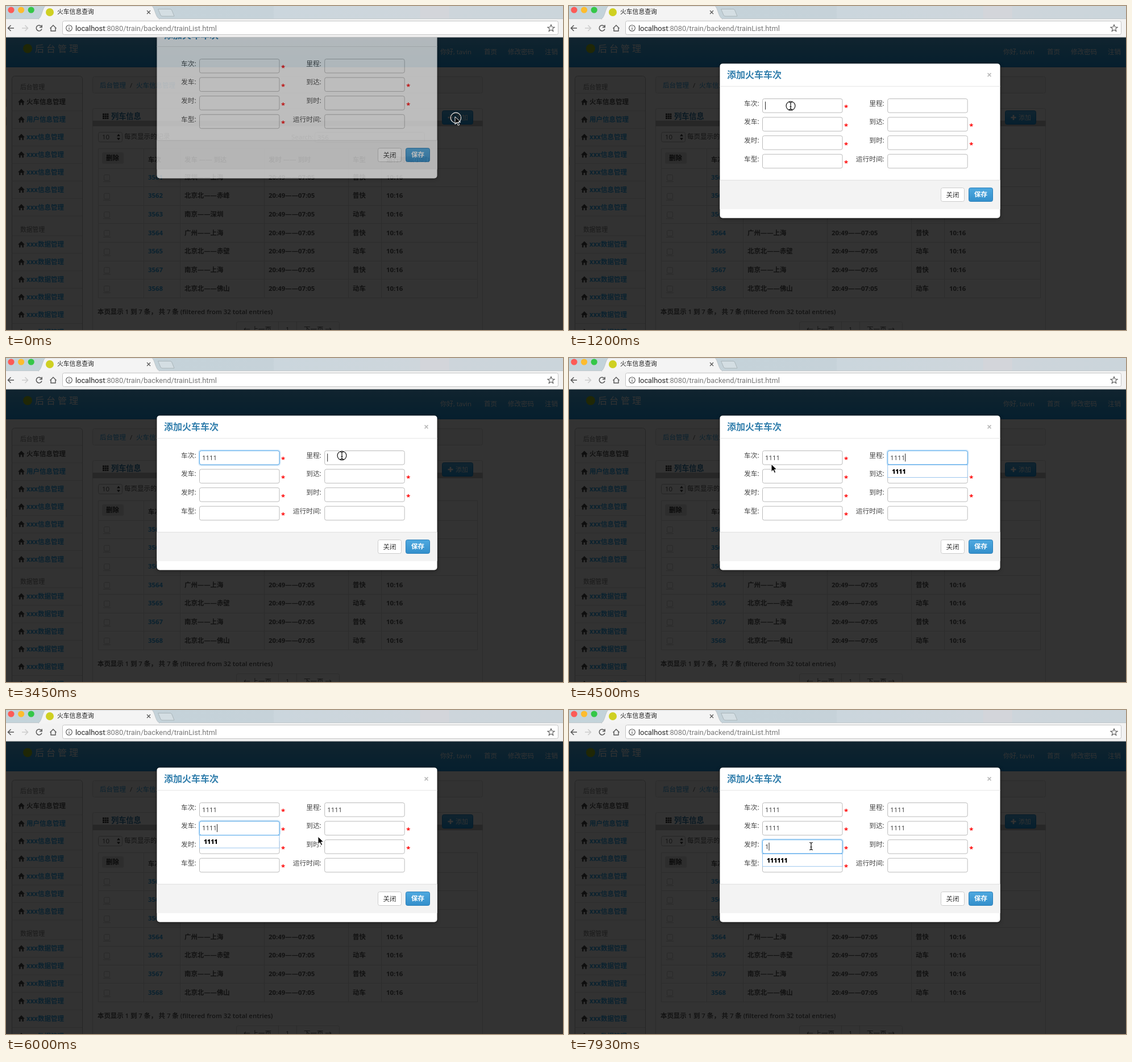
Recreate the animation shown at these times as an HTML page. Size 980 by 571 pixels, loop 8 s.

```html
<!DOCTYPE html>
<html lang="zh-CN">
<head>
<meta charset="utf-8">
<title>火车信息查询</title>
<style>
  html, body { margin: 0; width: 100%; height: 100%; overflow: hidden; background: #333; }
  svg { display: block; width: 980px; height: 571px; }
  text { font-family: "Open Sans", "Noto Sans CJK SC", "Noto Sans CJK", sans-serif; white-space: pre; }
  .card { filter: drop-shadow(0 2.6px 3px rgba(0, 0, 0, .3)); }
</style>
</head>
<body>
<svg id="stage" viewBox="0 0 980 571" xmlns="http://www.w3.org/2000/svg"></svg>
<script>
const LOOP = 8000, STEP = 150, LAST = 7930;
const BLUE = '#2fa4e7', INK = '#555', LINE = '#ddd';

// Markup helpers; text is placed by its vertical centre
const text = (x, cy, s, { size = 11.5, fill = INK, weight = 400, more = '' } = {}) =>
  `<text x="${x}" y="${cy + size * 0.37}" font-size="${size}" fill="${fill}" font-weight="${weight}" ${more}>${s}</text>`;
const rect = (x, y, w, h, fill, more = '') =>
  `<rect x="${x}" y="${y}" width="${w}" height="${h}" fill="${fill}" ${more}/>`;
const path = (d, stroke, width = 1, fill = 'none', more = '') =>
  `<path d="${d}" stroke="${stroke}" stroke-width="${width}" fill="${fill}" ${more}/>`;
const times = (n, f) => Array.from({ length: n }, (_, i) => f(i)).join('');
const edge = (color, r = 0) => `stroke="${color}" rx="${r}"`;

const defs = `<defs>
  <linearGradient id="blue" x2="0" y2="1"><stop stop-color="#54b4eb"/><stop offset=".6" stop-color="#2fa4e7"/><stop offset="1" stop-color="#1d9ce5"/></linearGradient>
  <linearGradient id="save" x2="0" y2="1"><stop stop-color="#4fa9e0"/><stop offset="1" stop-color="#338fcb"/></linearGradient>
  <linearGradient id="strip"><stop stop-color="#c3d3da"/><stop offset=".48" stop-color="#c6d2d9"/><stop offset=".481" stop-color="#cbd6dd"/>
    <stop offset=".743" stop-color="#ced6dc"/><stop offset=".744" stop-color="#d3d5da"/><stop offset=".795" stop-color="#d3d5da"/><stop offset=".796" stop-color="#cdd5db"/><stop offset="1" stop-color="#cbd5db"/></linearGradient>
</defs>`;

function navbar() {
  const white = { fill: '#fff' };
  return rect(0, 55, 980, 53, 'url(#blue)') + rect(0, 107, 980, 1, '#178acc') +
    '<circle cx="38" cy="75" r="8" fill="#9cc21f"/>' +
    text(51, 75, '后台管理', { size: 16, fill: '#fff', weight: 300, more: 'letter-spacing="4"' }) +
    text(764, 81, '你好, tavin', white) + text(841, 81, '首页', white) +
    text(883, 81, '修改密码', white) + text(948, 81, '注销', white);
}

function menu(top, title, labels) {
  return text(25, top, title, { size: 10.8, fill: '#777' }) + labels.map((label, i) => {
    const y = top + 26 + i * 30.9, current = label[0] === '火';
    return path(`M10.5 ${y - 15}H134`, LINE) +
      path(`M21 ${y + .5}l6-6l6 6h-2v5h-2.6v-4h-2.8v4H23v-5z`, 'none', 0, '#444') +
      text(36, y, label, { fill: current ? INK : BLUE, weight: 700 });
  }).join('');
}

function sidebar() {
  const info = ['火车信息管理', '用户信息管理', ...Array(5).fill('xxx信息管理')];
  return rect(10.5, 123.5, 124, 470, '#fdfdfd', edge('#bbb', 5)) +
    menu(143, '后台管理', info) + path('M10.5 370H134', LINE) +
    menu(394, '数据管理', Array(6).fill('xxx数据管理'));
}

function table() {
  const cols = [250, 314, 462, 610, 669];
  const heads = ['车次', '发车 —— 到达', '发时 —— 到时', '车型', '运行时间(小时)'];
  const routes = ['3561 深圳——上海', '3562 北京北——赤峰', '3563 南京——深圳', '3564 广州——上海',
    '3565 北京北——赤壁', '3567 南京——上海', '3568 北京北——佛山'];
  const bold = { size: 11.4, weight: 700 };
  const row = (route, i) => {
    const y = 301.5 + i * 32.65;
    const [id, trip] = route.split(' ');
    const cells = [id, trip, '20:49——07:05', i && i % 2 === 0 ? '动车' : '普快', '10:16'];
    return path(`M162 ${Math.round(y - 16) + .5}H829`, LINE) +
      rect(172.5, y - 4, 10, 10, '#fff', edge('#ccc', 2)) + path(`M171 ${y + 8}h13`, '#ccc') +
      cells.map((c, k) => text(cols[k], y, c, { ...bold, fill: k ? INK : BLUE })).join('');
  };
  return rect(162.5, 251.5, 667, 263, 'none', edge(LINE)) +
    path('M242.5 251V514M306.5 251V514M454.5 251V514M602.5 251V514M660.5 251V514', LINE) +
    rect(169, 258, 38, 20, '#e2e2e2', 'rx="3"') + text(176, 268, '删除', { ...bold, fill: '#333' }) +
    heads.map((h, k) => text(cols[k], 270.5, h, bold)).join('') + routes.map(row).join('');
}

function page() {
  return rect(0, 55, 980, 516, '#fff') + navbar() + sidebar() +
    rect(152.5, 124.5, 686, 29, '#fafafa', edge(LINE, 3)) +
    text(165, 139.5, '后台管理', { fill: BLUE }) + text(218, 139.5, '/') + text(229, 139.5, '火车信息管理', { fill: BLUE }) +
    rect(152.5, 180.5, 686, 400, '#fff', edge(LINE, 3)) + rect(152, 202, 687, 10, '#c4c4c4') +
    times(9, i => rect(170 + i % 3 * 3.7, 189.5 + (i / 3 | 0) * 3.5, 3, 2.7, '#333')) +
    text(185, 194, '列车信息', { size: 13.2, fill: '#317eac', weight: 700 }) +
    rect(767.5, 184.5, 54, 24, 'url(#blue)', edge('#178acc', 3)) +
    path('M777.5 196.5h9M782 192v9', '#fff', 2.6) + text(791, 196.5, '添加', { fill: '#fff', size: 11 }) +
    rect(162.5, 222.5, 42, 17, '#fff', edge('#bbb', 3)) + text(169, 231, '10') +
    path('M195 229.5l3-4l3 4zM195 232.5l3 4l3-4z', 'none', 0, '#333') +
    text(208, 230, '每页显示的记录', { weight: 500 }) +
    text(502, 231, 'Search:') + rect(543.5, 222.5, 193, 18, '#fff', edge('#bbb', 3)) + text(548, 231.5, '356') +
    table() +
    text(161, 538.5, '本页显示 1 到 7 条， 共 7 条 (filtered from 32 total entries)', { size: 11.4, weight: 600 }) +
    rect(405.5, 556.5, 181, 26, '#fff', edge(LINE, 3)) + path('M479.5 556V571M511.5 556V571', LINE) +
    text(418, 569.5, '← 上一页') + text(492, 569.5, '1') + text(524, 569.5, '下一页 →') +
    rect(0, 55, 980, 516, '#000', 'opacity=".8"');
}

// Form grid
const labels = ['车次', '里程', '发车', '到达', '发时', '到时', '车型', '运行时间'];
const W = 140.5, H = 24.5;
const fieldX = i => 340.5 + (i % 2) * 220.2;
const fieldY = i => 163.5 + (i >> 1) * 32.6;

function field(i) {
  const x = fieldX(i), y = fieldY(i), required = i % 2 === 0 || i === 3 || i === 5;
  return text(x - 6, y + 8, labels[i] + ':', { size: 11.7, fill: '#444', weight: 500, more: 'text-anchor="end"' }) +
    rect(x, y, W, H, '#fff', edge('#bbb', 3)) +
    `<g id="glow${i}" opacity="0">${rect(x, y, W, H, 'none', 'rx="3" stroke="#52a8ec" stroke-width="5" opacity=".22"')}` +
    `${rect(x, y, W, H, '#fff', edge('#52a8ec', 3))}</g>` +
    (required ? text(x + 143.5, y + 16, '*', { size: 13, fill: '#f00', weight: 700 }) : '') +
    text(x + 4.5, y + 12, '', { size: 11.4, fill: '#333', more: `id="value${i}"` }) +
    `<g id="caret${i}">${rect(0, y + 5, 1, 14, '#222')}</g>`;
}

function popup(i) {
  const x = fieldX(i), y = fieldY(i) + H;
  return `<g id="popup${i}">` + rect(x, y, W, 22.5, '#fff', edge('#9cc6ee')) + path(`M${x} ${y}h${W}`, '#52a8ec') +
    text(x + 7.5, y + 12, i === 4 ? '111111' : '1111', { size: 10.4, fill: '#000', weight: 800 }) + '</g>';
}

function modal() {
  return '<g id="modal"><g class="card">' + rect(264.5, 100.5, 495, 274.1, '#000', 'rx="5.5" opacity=".3"') +
    rect(265.4, 101.4, 493.2, 272.3, '#fff', 'rx="5"') + '</g>' +
    text(278, 121, '添加火车车次', { size: 16, fill: '#317eac', weight: 700 }) +
    text(735, 121, '×', { size: 16, fill: '#bbb', weight: 700 }) + path('M265.4 141.5H758.6', '#e6e6e6') +
    rect(265.4, 307, 493.2, 51, '#f3f3f3') + path('M265.4 307H758.6', '#ddd') +
    rect(654.5, 320.5, 41, 24, '#fff', edge('#ccc', 3)) + text(663.5, 332.5, '关闭', { fill: '#333' }) +
    rect(703.5, 320.5, 42, 24, 'url(#save)', edge('#2a7fba', 3)) + text(713, 332, '保存', { fill: '#fff', weight: 700 }) +
    times(8, field) + times(5, popup) + '</g>';
}

function chrome() {
  const lights = ['#fc5b57', '#fdbc2e', '#34c748'];
  return rect(0, 0, 980, 22, 'url(#strip)') + rect(0, 22, 980, 33, '#f2f2f2') +
    path('M0 22.5H980', '#c0c7cb') + rect(0, 54.6, 980, .9, '#b5b5b5') +
    path('M57 23C63 20 64 4 69 0H257C262 4 263 20 270 23z', '#b4bbbf', .7, '#f4f4f4') + rect(58, 22, 211, 2, '#f3f3f3') +
    lights.map((c, i) => `<circle cx="${9 + i * 17.6}" cy="7" r="5.6" fill="${c}"/>`).join('') +
    '<circle cx="77" cy="11" r="7" fill="#cfd022"/>' +
    text(90, 10.5, '火车信息查询', { size: 10.8, fill: '#222' }) +
    path('M248 8l6 6M254 8l-6 6', '#555', 1.2) +
    path('M267.5 5.5H289Q291 5.5 292 8L296 18H275Q273 18 272 16z', '#aab5ba', 1, '#d4dee3') +
    path('M14 39H4M8.5 34L3.5 39L8.5 44', '#555', 1.5) + path('M28 39H38M33.5 34L38.5 39L33.5 44', '#ccc', 1.5) +
    path('M62.3 36A5 5 0 1 0 63 40.5M63.2 33.5V37.5H59', '#555', 1.5) +
    path('M77.5 39.5L83 34L88.5 39.5M79 38.5V44H87V38.5', '#555', 1.4) +
    rect(99.5, 26.5, 872, 24, '#fff', edge('#c4c4c4', 3)) +
    '<circle cx="111" cy="39" r="5.3" fill="none" stroke="#555" stroke-width="1.1"/>' + path('M111 38.2V42M111 35.7V37', '#555', 1.2) +
    text(122, 39, '<tspan fill="#222">localhost</tspan>:8080/train/backend/trainList.html',
      { size: 12.8, fill: '#777', more: 'style="font-family:Roboto,sans-serif"' }) +
    path('M959 33l1.7 4.1l4.3.3l-3.3 2.8l1.1 4.3l-3.8-2.4l-3.8 2.4l1.1-4.3l-3.3-2.8l4.3-.3z', '#555', 1.1);
}

const cursor = `<g id="cursor">
  <g id="arrow">${path('M0 0V13.5L3.2 10.6L5.4 15.5L7.7 14.5L5.5 9.7H9.8z', '#fff', 1, '#000')}</g>
  <g id="beam">${path('M-3-6.5Q0-6.5 0-4.5Q0-6.5 3-6.5M0-5V5M-3 6.5Q0 6.5 0 4.5Q0 6.5 3 6.5M-1.5 1.5H1.5', '#111', 1.2)}</g>
  <g id="ring" fill="none" stroke-width="1.3"><circle r="9" stroke="#fff"/><circle r="7.9" stroke="#222"/></g></g>`;

document.getElementById('stage').innerHTML = defs + page() + modal() + chrome() + cursor;

// When each field is clicked, typed into, and left by the pointer
const entries = [
  { click: 1200, keys: [2100, 2400, 2550, 2700], leave: 3150 },
  { click: 3450, keys: [3900, 4050, 4200, 4350], leave: 4350 },
  { click: 4950, keys: [5400, 5550, 5700, 5850], leave: 5850 },
  { click: 6300, keys: [6600, 6750, 6900, 6900], leave: 7200 },
  { click: 7500, keys: [7950], leave: LOOP }
];
const route = [[450, 790, 195], [1050, 390, 176], [3000, 390, 176], [3150, 500, 216], [3450, 591, 172],
  [4200, 591, 172], [4500, 356, 187], [4800, 390, 208], [5700, 390, 208], [6000, 549, 223],
  [6300, 600, 208], [7050, 600, 208], [7350, 426, 240]];

const $ = id => document.getElementById(id);
const show = (id, on) => $(id).setAttribute('visibility', on ? 'visible' : 'hidden');
const clamp = v => Math.max(0, Math.min(1, v));

function pointerAt(t) {
  const next = route.findIndex(p => p[0] > t);
  if (next === 0) return route[0].slice(1);
  if (next < 0) return route[route.length - 1].slice(1);
  const [t0, x0, y0] = route[next - 1], [t1, x1, y1] = route[next];
  const k = (t - t0) / (t1 - t0);
  return [x0 + (x1 - x0) * k, y0 + (y1 - y0) * k];
}

function drawField(e, i, t) {
  const end = entries[i + 1] ? entries[i + 1].click : Infinity;
  const active = t >= e.click && t < end;
  const typed = e.keys.filter(k => k <= t);
  const since = t - (typed.length ? typed[typed.length - 1] : e.click);
  $('glow' + i).setAttribute('opacity', clamp((t - e.click) / 200) - clamp((t - end) / 200));
  $('value' + i).textContent = '1'.repeat(typed.length);
  $('caret' + i).setAttribute('transform', `translate(${fieldX(i) + 4.5 + typed.length * 6.5} 0)`);
  show('caret' + i, active && Math.floor(since / 600) % 2 === 0);
  show('popup' + i, active && typed.length > 0);
}

function drawCursor(t) {
  const [x, y] = pointerAt(t);
  const over = labels.some((_, i) => {
    const dx = x - fieldX(i), dy = y - fieldY(i);
    return dx > 1 && dx < W - 1 && dy > 1 && dy < H - 1;
  });
  const hidden = entries.some(e => t >= e.keys[1] && t < e.leave);
  $('cursor').setAttribute('transform', `translate(${x} ${y})`);
  $('ring').setAttribute('transform', over ? '' : 'translate(1.5 2)');
  show('arrow', !hidden && !over);
  show('beam', !hidden && over);
  show('ring', t === 0 || entries.some(e => e.click === t));
}

function draw() {
  const now = performance.now() % LOOP;
  const t = now >= LAST ? 7950 : Math.floor(now / STEP) * STEP;
  $('modal').setAttribute('transform', t ? '' : 'translate(0 -70)');
  $('modal').setAttribute('opacity', t ? 1 : 0.68);
  entries.forEach((e, i) => drawField(e, i, t));
  drawCursor(t);
  requestAnimationFrame(draw);
}
draw();
</script>
</body>
</html>
```
